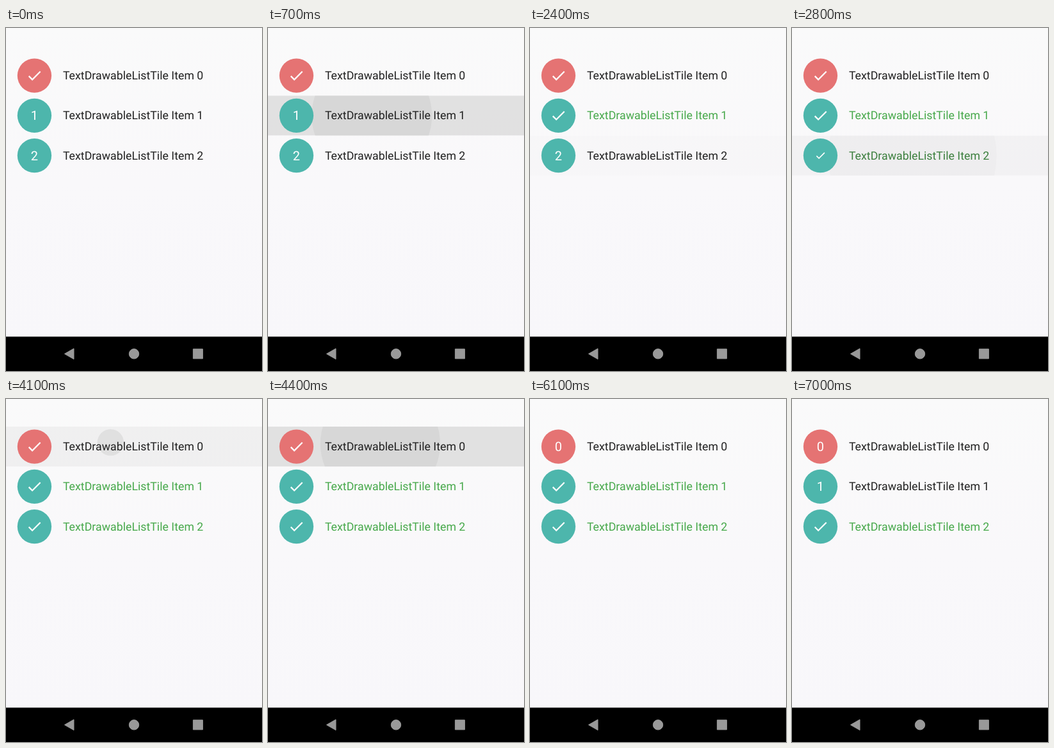
Animation, 400 px wide and 534 px high, one loop 7700 ms. Source, as an HTML page:

```html
<!DOCTYPE html>
<html lang="en">
<head>
<meta charset="utf-8">
<title>Selectable list tiles</title>
<style>
  html, body { margin: 0; width: 100%; height: 100%; overflow: hidden; }
  #stage { display: block; width: 100vw; height: 100vh; font-family: Roboto, sans-serif; }
  text { text-rendering: geometricPrecision; }
</style>
</head>
<body>
<svg id="stage" viewBox="0 0 400 534">
  <defs>
    <linearGradient id="paper" x2="0" y2="1">
      <stop stop-color="#fafafa"/>
      <stop offset=".45" stop-color="#f9f8fa"/>
      <stop offset="1" stop-color="#f8f7fa"/>
    </linearGradient>
  </defs>
  <rect width="400" height="534" fill="url(#paper)"/>
  <g id="list"></g>
  <rect y="480.5" width="400" height="54"/>
  <g fill="#999" stroke="#999" stroke-linejoin="round">
    <path d="M91.5 507.3L106 499V515.6Z"/>
    <circle cx="200" cy="507.3" r="7.7"/>
    <rect x="292.4" y="499.8" width="15" height="15"/>
  </g>
</svg>
<script>
const LOOP = 7700, STEP = 100, FADE = 200;
const WIDTH = 400, ROW = 62.22, TOP = 43, MID = ROW / 2, AVATAR = 44.44;
const BLACK = [32, 32, 32], GREEN = [70, 168, 74];
const CHECK = 'M9 16.17L4.83 12l-1.42 1.41L9 19 21 7l-1.41-1.41z';

const taps = [
  { row: 1, press: 340, release: 730, x: 141, y: 31, on: 1 },
  { row: 2, press: 2380, release: 2660, x: 172, y: 31, on: 1 },
  { row: 0, press: 4015, release: 4480, x: 160, y: 24, on: 1 },
  { row: 0, press: 5450, release: 5620, x: 160, y: 28, on: 0 },
  { row: 1, press: 6450, release: 6620, x: 160, y: 31, on: 0 }
];

const clamp = v => Math.max(0, Math.min(1, v));
const mix = (a, b, k) => a + (b - a) * k;

function add(parent, tag, attrs, content = '') {
  const el = document.createElementNS('http://www.w3.org/2000/svg', tag);
  set(el, attrs);
  el.textContent = content;
  return parent.appendChild(el);
}

function set(el, attrs) {
  for (const name in attrs) el.setAttribute(name, attrs[name]);
}

function makeRow(index) {
  const svg = add(document.getElementById('list'), 'svg',
    { y: TOP + index * ROW, width: WIDTH, height: ROW });
  const highlight = add(svg, 'rect', { width: WIDTH, height: ROW, fill: '#bcbcbc' });
  const splash = add(svg, 'circle', { fill: '#c8c8c8' });
  add(svg, 'circle', { cx: AVATAR, cy: MID, r: 26.67, fill: index ? '#4db6ac' : '#e57373' });
  const digit = add(svg, 'text',
    { y: 7.1, 'font-size': 20, 'text-anchor': 'middle', fill: '#fff' }, index);
  const check = add(svg, 'path', { d: CHECK, fill: '#fff' });
  const label = add(svg, 'text', { x: 88.89, y: MID + 6.1, 'font-size': 17.78 },
    `TextDrawableListTile Item ${index}`);
  return { index, highlight, splash, digit, check, label };
}

function drawInk(row, tap, t) {
  const held = Math.min(t, tap.release) - tap.press;
  const after = Math.max(0, t - tap.release);
  const fade = 1 - clamp(after / FADE);
  const grow = clamp(held / 1000 + after / 480);
  const reach = Math.hypot(Math.max(tap.x, WIDTH - tap.x), Math.max(tap.y, ROW - tap.y));
  set(row.highlight, { opacity: 0.4 * clamp(held / FADE) * fade });
  // The splash drifts toward the middle of its row as it grows.
  set(row.splash, {
    cx: mix(tap.x, WIDTH / 2, grow), cy: mix(tap.y, MID, grow),
    r: reach * grow, opacity: 0.4 * fade
  });
}

function drawRow(row, t) {
  let selected = 0, checked = row.index === 0 ? 1 : 0, current;
  for (const tap of taps) {
    if (tap.row !== row.index || t < tap.press) continue;
    const k = clamp((t - tap.release) / FADE);
    selected = mix(selected, tap.on, k);
    checked = mix(checked, tap.on, k);
    current = tap;
  }
  if (current) drawInk(row, current, t);
  else for (const ink of [row.highlight, row.splash]) set(ink, { opacity: 0 });

  const place = `translate(${AVATAR} ${MID})`;
  set(row.digit, { transform: `${place} scale(${clamp(1 - checked / 0.6)})` });
  set(row.check, { transform: `${place} scale(${checked * 10 / 9}) translate(-12 -12)` });
  set(row.label, { fill: `rgb(${BLACK.map((c, i) => Math.round(mix(c, GREEN[i], selected)))})` });
}

const rows = [0, 1, 2].map(makeRow);
const start = performance.now();

function tick() {
  const t = Math.floor((performance.now() - start) % LOOP / STEP) * STEP;
  rows.forEach(row => drawRow(row, t));
  requestAnimationFrame(tick);
}
tick();
</script>
</body>
</html>
```
